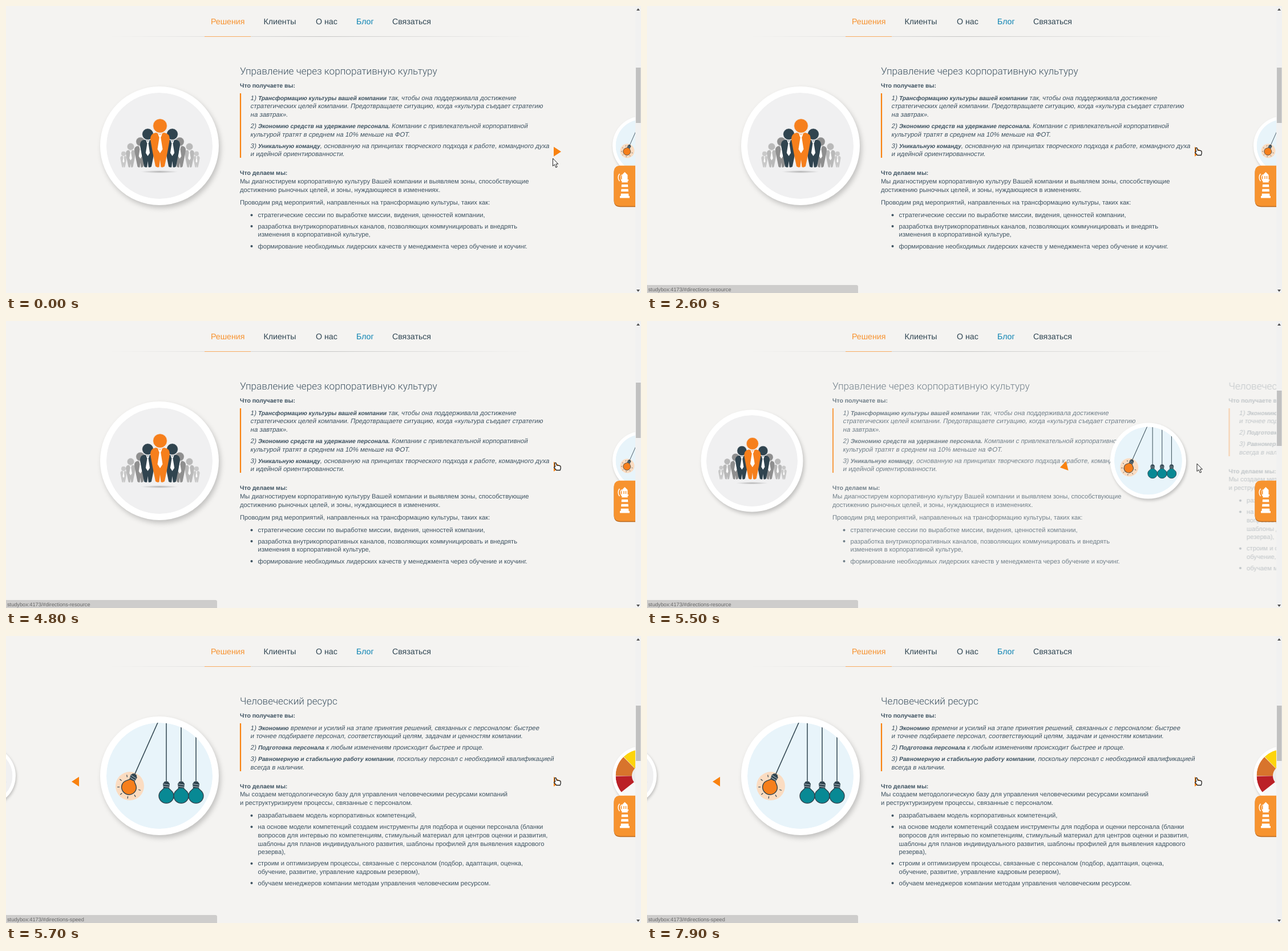
Animation of 1113x503 px, one loop 8 s. Source, as an HTML page:

```html
<!DOCTYPE html>
<html lang="ru">
<head>
<meta charset="utf-8">
<title>Решения</title>
<style>
html, body { margin: 0; width: 100%; height: 100%; overflow: hidden; background: #f4f3f1; }
svg { display: block; width: 1113px; height: 503px; }
text { font: 11.18px "Liberation Sans", sans-serif; fill: #3d5261; white-space: pre; text-rendering: geometricPrecision; }
.b { font-size: 10.5px; font-weight: bold; }
/* slanted upright letters: the italic face has other Cyrillic forms */
.i { font-size: 11.4px; transform: skewX(-11deg); transform-box: fill-box; transform-origin: 0 80%; }
.bi { font-size: 10.3px; font-weight: bold; }
.h { font: 300 17.15px Roboto, sans-serif; }
.nav text { font-size: 14.2px; fill: #2f4552; }
.status text { font-size: 9.2px; fill: #666; }
.rim { fill: #fff; filter: drop-shadow(3px 5px 4px #0003); }
</style>
</head>
<body>
<script>
const LOOP = 8000, STEP = 100, CLICK = 5400, SLIDE = 287, SMALL = .5;
const ORANGE = '#f98210', DARK = '#30444f', TEAL = '#088994';

const text = (x, y, s, cls = '') => `<text x="${x}" y="${y}" class="${cls}">${s}</text>`;
const lines = (x, list, cls) => list.map(([y, s]) => text(x, y, s, cls)).join('');
const bullet = (y, ...rows) => `<circle cx="430.5" cy="${y - 3.5}" r="2" fill="#3d5261"/>` +
  rows.map((s, i) => text(441.5, y + i * 14.8, s)).join('');
const point = (y, n, bold, rest) => text(428, y, `${n}) <tspan class="bi">${bold}</tspan>${rest}`, 'i');
const quoteBar = h => `<path d="M411 153v${h}" stroke="${ORANGE}" stroke-width="2.2"/>`;

const culture = text(410, 120, 'Управление через корпоративную культуру', 'h') +
  text(410, 142.5, 'Что получаете вы:', 'b') + quoteBar(113) +
  point(164.5, 1, 'Трансформацию культуры вашей компании', ' так, чтобы она поддерживала достижение') +
  lines(428, [
    [179.3, 'стратегических целей компании. Предотвращаете ситуацию, когда «культура съедает стратегию'],
    [194.2, 'на завтрак».'],
    [228.7, 'культурой тратят в среднем на 10% меньше на ФОТ.'],
    [263.2, 'и идейной ориентированности.']], 'i') +
  point(213.8, 2, 'Экономию средств на удержание персонала.', ' Компании с привлекательной корпоративной') +
  point(248.5, 3, 'Уникальную команду', ', основанную на принципах творческого подхода к работе, командного духа') +
  text(410, 296, 'Что делаем мы:', 'b') +
  lines(410, [
    [311, 'Мы диагностируем корпоративную культуру Вашей компании и выявляем зоны, способствующие'],
    [325.8, 'достижению рыночных целей, и зоны, нуждающиеся в изменениях.'],
    [347.8, 'Проводим ряд мероприятий, направленных на трансформацию культуры, таких как:']]) +
  bullet(370, 'стратегические сессии по выработке миссии, видения, ценностей компании,') +
  bullet(389.5, 'разработка внутрикорпоративных каналов, позволяющих коммуницировать и внедрять',
    'изменения в корпоративной культуре,') +
  bullet(424.5, 'формирование необходимых лидерских качеств у менеджмента через обучение и коучинг.');

const staff = text(410, 120, 'Человеческий ресурс', 'h') +
  text(410, 142.5, 'Что получаете вы:', 'b') + quoteBar(84) +
  point(164.5, 1, 'Экономию', ' времени и усилий на этапе принятия решений, связанных с персоналом: быстрее') +
  lines(428, [
    [179.3, 'и точнее подбираете персонал, соответствующий целям, задачам и ценностям компании.'],
    [233.5, 'всегда в наличии.']], 'i') +
  point(199, 2, 'Подготовка персонала', ' к любым изменениям происходит быстрее и проще.') +
  point(218.7, 3, 'Равномерную и стабильную работу компании', ', поскольку персонал с необходимой квалификацией') +
  text(410, 266.5, 'Что делаем мы:', 'b') +
  lines(410, [
    [281.3, 'Мы создаем методологическую базу для управления человеческими ресурсами компаний'],
    [296.3, 'и реструктуризируем процессы, связанные с персоналом.']]) +
  bullet(318.3, 'разрабатываем модель корпоративных компетенций,') +
  bullet(338, 'на основе модели компетенций создаем инструменты для подбора и оценки персонала (бланки',
    'вопросов для интервью по компетенциям, стимульный материал для центров оценки и развития,',
    'шаблоны для планов индивидуального развития, шаблоны профилей для выявления кадрового',
    'резерва),') +
  bullet(402.2, 'строим и оптимизируем процессы, связанные с персоналом (подбор, адаптация, оценка,',
    'обучение, развитие, управление кадровым резервом),') +
  bullet(436.6, 'обучаем менеджеров компании методам управления человеческим ресурсом.');

// Disc pictures, drawn around the disc centre
const person = (x, s, fill) => `<g transform="translate(${x} 38) scale(${s})">
  <path fill="${fill}" d="M-17-49Q-17-60-7-61L0-58 7-61Q17-60 17-49L13-27 8-2Q4 1 1.5-1L0-14-1.5-1Q-4 1-8-2L-13-27Z"/>
  <circle cy="-73" r="12.3" fill="${fill}" stroke="#f0f0f1" stroke-width=".6"/>
  <path fill="#fff" d="M-4-60L0-57 4-60 2-54 1.2-53 4.5-32 0-25-4.5-32-1.2-53-2-54Z"/></g>`;
const pair = (dx, s, fill) => person(1 - dx, s, fill) + person(1 + dx, s, fill);
const team = '<ellipse cy="45.5" rx="33" ry="2.5" fill="url(#ground)"/>' +
  pair(64, .33, '#c9c9c9') + pair(51.5, .5, '#b9b9b9') + pair(34.5, .62, '#8f8f8f') +
  pair(21.5, .8, DARK) + person(1, 1, '#f67f1c');

const bulb = (x, y, fill, turn = 0) => `<g transform="translate(${x} ${y}) rotate(${turn})" stroke="${DARK}">
  <path d="M0-22V-150" stroke-width="1.5"/>
  <path d="M-4-13C-5-9-13-8-13 1A13 13 0 0 0 13 1C13-8 5-9 4-13Z" fill="${fill}" stroke-width="1.4"/>
  <path d="M-3-24H3L6-20 5-12H-5L-6-20Z" fill="${DARK}" stroke="none"/>
  <path d="M-5-19.5L5-18M-5-15.5L5-14" stroke="#b9c6cc"/></g>`;
const rays = [0, 1, 2, 3, 4, 5, 6].map(n =>
  `<path d="M0 17v4" transform="rotate(${n * 40 - 96})" stroke="${DARK}" stroke-width="1.2"/>`).join('');
const cradle = '<circle cx="-52" cy="18" r="25" fill="#fbdcc1"/>' +
  `<g transform="translate(-53 19) rotate(24)">${rays}</g>` +
  bulb(-53, 19, '#f67f1c', 24) + [12, 38, 64].map(x => bulb(x, 34, TEAL)).join('');

const sector = (from, size, colour) => `<circle r="64" fill="none" stroke="${colour}" stroke-width="58"
  pathLength="360" stroke-dasharray="${size} ${360 - size}" transform="rotate(${from})"/>`;
const gauge = sector(142, 37, '#bb2027') + sector(180, 45, '#d8742c') + sector(226, 49, '#fdd40c') +
  '<circle r="36" fill="#ececec"/>';

const disc = (id, fill, art) => `<g id="${id}"><circle r="104" class="rim"/>
  <g clip-path="url(#inner)"><circle r="93" fill="${fill}"/>${art}</g></g>`;
const triangle = id => `<path id="${id}" d="M-6.5-8.5L6.5 0-6.5 8.5Z" fill="${ORANGE}"/>`;

const menu = [[359, 'Решения', '#f7922f'], [451.5, 'Клиенты'], [543, 'О нас'], [614, 'Блог', '#0a82b2'], [677, 'Связаться']]
  .map(([x, s, c]) => `<text x="${x}" y="32" ${c ? `style="fill:${c}"` : ''}>${s}</text>`).join('');

const lighthouse = `<path d="M1103 281.2h-26q-11.5 0-11.5 11.5v48q0 11.5 11.5 11.5h26z" fill="#b96a22"/>
  <path d="M1103 279.7h-26q-11.5 0-11.5 11.5v48q0 11.5 11.5 11.5h26z" fill="#f7932f"/>
  <path fill="#fff" d="M1079.5 296L1084.5 291 1089.5 296V304H1091V306.5H1089.5L1091.5 333H1093V336.5H1076V333H1077.5L1079.5 306.5H1078V304H1079.5Z"/>
  <path d="M1079 311h11M1078 319h13M1077 327h15" stroke="#f7932f" stroke-width="3.4"/>
  <path id="lamp" d="M1083 298v5M1086.5 298v5" stroke="#f7932f" stroke-width="1.4"/>
  <g fill="none" stroke="#fff" stroke-width="1.5"><path d="M1075.5 294a10 10 0 0 0 0 13"/>
  <path id="wave" d="M1079 295.5a8 8 0 0 0 0 10"/></g>`;

document.body.innerHTML = `<svg viewBox="0 0 1113 503">
  <defs><clipPath id="inner"><circle r="93"/></clipPath>
  <radialGradient id="ground"><stop stop-color="#0004"/><stop offset="1" stop-color="#0000"/></radialGradient>
  <linearGradient id="rule"><stop stop-color="#ccc" stop-opacity="0"/><stop offset=".5" stop-color="#c4c4c3"/>
  <stop offset="1" stop-color="#ccc" stop-opacity="0"/></linearGradient></defs>
  <g class="nav">${menu}</g>
  <rect x="180" y="53" width="742" height="1" fill="url(#rule)"/>
  <rect x="348" y="53" width="81" height="1" fill="#f8ab62"/>
  <g id="text1">${culture}</g>${disc('disc1', '#f0f0f1', team)}
  <g id="text2">${staff}</g>${disc('disc2', '#e8f4fa', cradle)}
  ${disc('disc3', '#f7f7f7', gauge)}
  ${triangle('arrow1')}${triangle('arrow2')}
  ${lighthouse}
  <g class="status" id="status"><path d="M0 489h367q3 0 3 3v11H0z" fill="#cecdcc"/><text id="link" x="2" y="500.3"></text></g>
  <rect x="1103" width="10" height="503" fill="#f1f1f1"/>
  <rect id="thumb" x="1104" width="8.5" height="97" fill="#c1c1c1"/>
  <path d="M1105 8l3-4 3 4zM1105 497l3 4 3-4z" fill="#505050"/>
  <path id="pointer" d="M0 0V13.5L3 10.7 5.3 16 7.6 15 5.3 9.9H9.4Z" fill="#fff" stroke="#222"/>
  <path id="hand" d="M1 1.5Q1 0 2.3 0 3.5 0 3.8 1.5L4.6 4.5 9.5 5Q11.5 5.4 11.5 7.5V10L10.5 13H4L0 8.5Q-.5 7 1.8 7Z" fill="#fff" stroke="#222" stroke-width="1.3"/>
</svg>`;

const el = id => document.getElementById(id);
const place = (id, x, y, more = '') => el(id).setAttribute('transform', `translate(${x} ${y}) ${more}`);
const show = (id, on) => el(id).style.opacity = +on;
const mix = (a, b, k) => a + (b - a) * k;

function draw(t) {
  const u = Math.min(1, Math.max(0, (t - CLICK) / SLIDE));
  const p = u * u * (3 - 2 * u);

  const x1 = -304 * p, x2 = 846 * (1 - p), x3 = x2 + 846;
  place('text1', x1, 0);
  place('text2', x2, 0);
  show('text1', 1 - p);
  show('text2', p);
  place('disc1', 269 + x1, 245, `scale(${mix(1, SMALL, p)})`);
  place('disc2', 269 + x2, 245, `scale(${mix(SMALL, 1, p)})`);
  place('disc3', 269 + x3, 245, `scale(${SMALL})`);
  place('arrow1', 966.5 - 845 * p, 255.3, `rotate(${180 * (1 - (1 - u) ** 6)})`);
  place('arrow2', 966.5 + x2, 255.3);

  const flash = t % 1000 >= 600 && t % 1000 < 900;
  show('lamp', flash);
  show('wave', flash ? 1 : .55);

  el('thumb').setAttribute('y', t < CLICK ? 108 : 122);
  show('status', t >= 300);
  el('link').textContent = 'studybox:4173/#directions-' + (t < 5700 ? 'resource' : 'speed');

  const early = t < 200, free = early || (t >= CLICK && t < 5700);
  show('pointer', free);
  show('hand', !free);
  place('pointer', early ? 958.5 : 964, early ? 267 : 250);
  place('hand', 960.7, t < 1400 ? 247.5 : 248.5);
}

const start = performance.now();
function tick() {
  const t = (performance.now() - start) % LOOP;
  draw(Math.floor(t / STEP) * STEP);
  requestAnimationFrame(tick);
}
tick();
</script>
</body>
</html>
```
